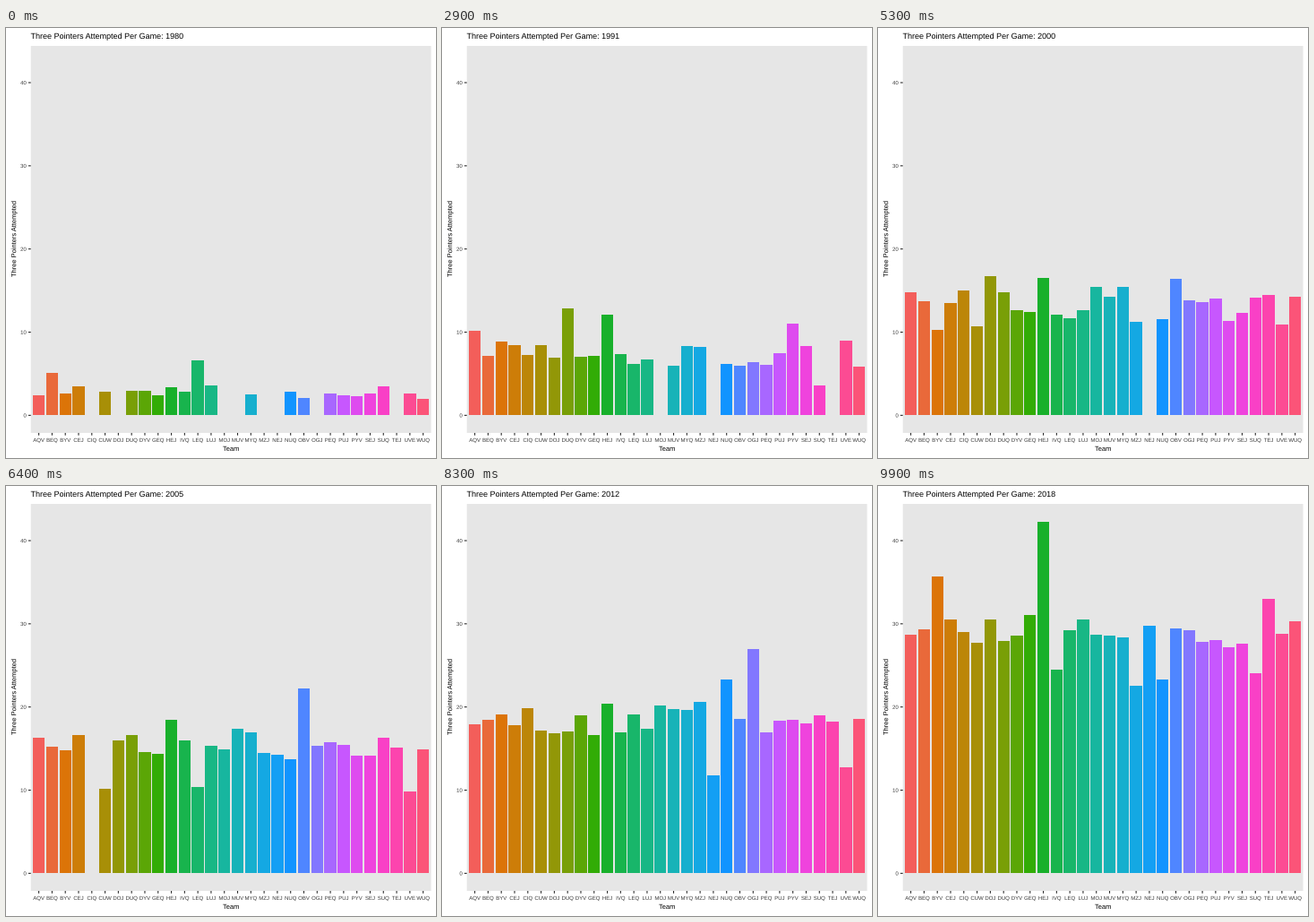
Animation, 480 px wide and 480 px high, one loop 10 s. Source, as a matplotlib script:

```python
import numpy as np
import matplotlib.pyplot as plt
from matplotlib.animation import FuncAnimation
from matplotlib.patheffects import Normal

SIZE, DPI = 480, 72
FRAMES, INTERVAL = 100, 100
FIRST, LAST = 1980, 2018
PEAK = 42.3

TEAMS = ("AQV BEQ BYV CEJ CIQ CUW DOJ DUQ DYV GEQ HEJ IVQ LEQ LUJ MOJ "
         "MUV MYQ MZJ NEJ NUQ OBV OGJ PEQ PUJ PYV SEJ SUQ TEJ UVE WUQ").split()
N = len(TEAMS)

# League average at its turning points
LEAGUE = {1980: 2.7, 1984: 2.4, 1986: 3.3, 1989: 6.6, 1992: 7.6, 1994: 9.9, 1995: 15.3,
          1997: 16.8, 1998: 12.7, 2004: 14.9, 2008: 18.1, 2012: 18.4, 2015: 22.4, 2018: 29}

# Teams far from the average
STANDOUTS = {
    "AQV": {1991: 10.2}, "BEQ": {1980: 5.1}, "BYV": {1996: 9.1, 2018: 35.7},
    "CUW": {2005: 10.3}, "DOJ": {1996: 24.9}, "DUQ": {1991: 12.85},
    "HEJ": {1991: 12.1, 1996: 21.5, 2018: PEAK}, "IVQ": {1996: 11.9, 2018: 24.5},
    "LEQ": {1980: 6.6, 2005: 10.4}, "MZJ": {1996: 10.5, 2018: 22.5},
    "NEJ": {2012: 11.8}, "NUQ": {2012: 23.3, 2018: 23.3}, "OBV": {2005: 22.9},
    "OGJ": {2012: 27}, "PYV": {1991: 11}, "SUQ": {1991: 3.6, 2018: 24.1},
    "TEJ": {2018: 33}, "UVE": {2005: 9.4, 2012: 12.75},
}

JOINED = {"DOJ": 1981, "CIQ": 1989, "MUV": 1989, "MZJ": 1990, "OGJ": 1990,
          "MOJ": 1996, "TEJ": 1996, "NEJ": 2003}
PAUSED = {"CIQ": (2003, 2004)}

YEARS = np.arange(FIRST, LAST + 1)
STEPS = np.round((YEARS - FIRST) * (FRAMES - 1) / (LAST - FIRST))
ANCHORS = [1980, 1986, 1991, 1996, 2005, 2012, 2018]


def average(years):
    return np.interp(years, list(LEAGUE), list(LEAGUE.values()))


def season_table():
    """Attempts per season and team, NaN where a team does not play."""
    rng = np.random.default_rng(8)
    spread = np.linspace(0.3, 0.08, len(ANCHORS))
    table = np.empty((len(YEARS), N))
    for i, team in enumerate(TEAMS):
        share = np.exp(spread * rng.uniform(-1, 1, len(ANCHORS)))
        wobble = np.exp(rng.normal(0, 0.05, len(YEARS)))
        wobble[np.isin(YEARS, ANCHORS)] = 1
        for year, value in STANDOUTS.get(team, {}).items():
            share[ANCHORS.index(year)] = value / average(year)
        table[:, i] = average(YEARS) * np.interp(YEARS, ANCHORS, share) * wobble
        away = (YEARS < JOINED.get(team, FIRST)) | np.isin(YEARS, PAUSED.get(team, ()))
        table[away, i] = np.nan
    return table


TABLE = season_table()


def heights(step):
    j = np.searchsorted(STEPS, step, side="right") - 1
    if STEPS[j] == step:
        row = TABLE[j]
    else:
        t = (step - STEPS[j]) / (STEPS[j + 1] - STEPS[j])
        row = TABLE[j] * (1 - t) + TABLE[j + 1] * t
    return np.nan_to_num(row)


def to_xyz(primaries):
    """RGB to XYZ matrix for the given primaries and a D65 white."""
    cols = np.array([(x / y, 1, (1 - x - y) / y) for x, y in primaries]).T
    return cols * np.linalg.solve(cols, [0.95047, 1, 1.08883])


SRGB = to_xyz([(0.64, 0.33), (0.30, 0.60), (0.15, 0.06)])
SCREEN = to_xyz([(0.6295, 0.3407), (0.2949, 0.6055), (0.1551, 0.0762)])


def hue_color(deg, chroma=100, lum=65):
    """Evenly light hue, shown on a gamma 1.8 screen."""
    h = np.radians(deg)
    y = ((lum + 16) / 116) ** 3
    u = chroma * np.cos(h) / (13 * lum) + 0.19784
    v = chroma * np.sin(h) / (13 * lum) + 0.46834
    x = 9 * y * u / (4 * v)
    z = 3 * y / v - x / 3 - 5 * y
    rgb = np.clip(np.linalg.solve(SRGB, [x, y, z]), 0, 1)
    rgb = np.clip(np.linalg.solve(SCREEN, SRGB @ rgb), 0, 1)
    return tuple(rgb ** (1 / 1.8))


plt.rcParams.update({"font.family": "Liberation Sans", "text.hinting": "none",
                     "toolbar": "None"})
OUTLINE = [Normal()]  # draws text as paths, so glyphs keep sub-pixel spacing
LEFT, RIGHT, TOP, BOTTOM = 27.74, 474.52, 20, 452
WIDTH, HEIGHT = RIGHT - LEFT, BOTTOM - TOP
TICK = 2.75

fig = plt.figure(figsize=(SIZE / DPI, SIZE / DPI), dpi=DPI, facecolor="white")
ax = fig.add_axes([LEFT / SIZE, 1 - BOTTOM / SIZE, WIDTH / SIZE, HEIGHT / SIZE],
                  facecolor="#E6E6E6")
ax.patch.set_snap(False)
ax.spines[:].set_visible(False)
ax.set_xlim(0.4, N + 0.6)
ax.set_ylim(-0.05 * PEAK, 1.05 * PEAK)

slots = np.arange(1, N + 1)
levels = np.arange(0, 41, 10)
bars = ax.bar(slots, heights(0), width=0.9, linewidth=0,
              color=[hue_color(15 + 360 * i / N) for i in range(N)])

tick_style = dict(color="#262626", linewidth=1.07, clip_on=False, snap=False)
ax.vlines(slots, -TICK / HEIGHT, 0, transform=ax.get_xaxis_transform(), **tick_style)
ax.hlines(levels, -TICK / WIDTH, 0, transform=ax.get_yaxis_transform(), **tick_style)
ax.tick_params(length=0, labelcolor="#3C3C3C", labelsize=6, pad=TICK + 2.2)
ax.tick_params(axis="x", pad=10)
ax.set_xticks(slots, TEAMS, va="baseline", path_effects=OUTLINE)
ax.set_yticks(levels, [str(v) for v in levels], path_effects=OUTLINE)


def label(x, y, text, size, **style):
    return fig.text(x / SIZE, 1 - y / SIZE, text, fontsize=size, color="black",
                    va="baseline", rotation_mode="anchor", path_effects=OUTLINE, **style)


title = label(LEFT - 0.2, 12, "", 9, ha="left")
label((LEFT + RIGHT) / 2, 472, "Team", 7.5, ha="center")
label(11.2, 235.5, "Three Pointers Attempted", 7.5, ha="center", rotation=90)


def update(step):
    year = round(FIRST + (LAST - FIRST) * step / (FRAMES - 1))
    title.set_text(f"Three Pointers Attempted Per Game: {year}")
    for bar, h in zip(bars, heights(step)):
        bar.set_height(h)
    return [title, *bars]


anim = FuncAnimation(fig, update, frames=FRAMES, interval=INTERVAL,
                     repeat=True, repeat_delay=0, blit=False)
plt.show()
```
